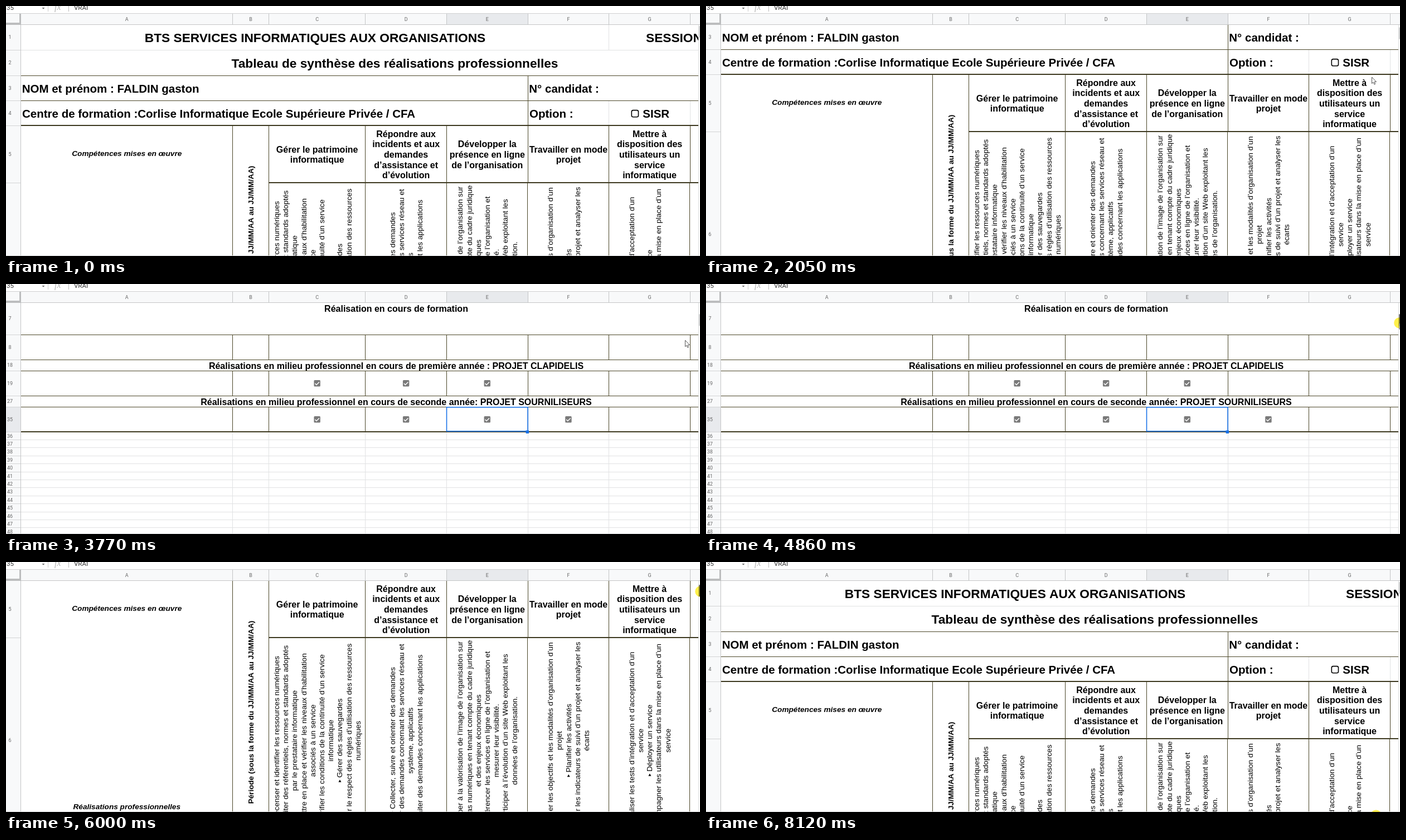
An HTML page with a canvas that plays this animation: 1245 by 450 pixels, repeating every 8250 ms.

```html
<!DOCTYPE html>
<html lang="fr">
<head>
<meta charset="utf-8">
<title>Tableau de synthèse</title>
<style>
html, body { margin: 0; width: 100%; height: 100%; overflow: hidden; background: #fff; }
canvas { display: block; }
</style>
</head>
<body>
<canvas id="stage" width="1245" height="450"></canvas>
<script>
const ctx = document.getElementById('stage').getContext('2d');
const LOOP = 8250, HEAD = 34, RIGHT = 1243;
const ARIAL = '"Liberation Sans", Arial, sans-serif';
const ROBOTO = 'Roboto, Arial, sans-serif';
const DARK = '#4b4628', THICK = '#3d3920', PALE = '#e1e2e3';

const cols = [27, 406.5, 471.5, 644.8, 790.45, 936.1, 1081.75, 1227.4];
const tops = [34, 80, 126, 171, 216, 319, 689, 747, 792, 812, 857, 877, 922];
const labels = [1, 2, 3, 4, 5, 6, 7, 8, 18, 19, 27, 35];
for (let n = 36; n < 56; n++) {
  labels.push(n);
  tops.push(922 + (n - 35) * 14.4);
}
const rowMid = i => (tops[i] + tops[i + 1]) / 2;
const colMid = i => (cols[i] + cols[i + 1]) / 2;

// [time, index of the first visible row]
const scrolls = [[0, 0], [1980, 1], [2050, 2], [2510, 4], [3100, 5], [3640, 6],
  [4980, 5], [5930, 4], [6060, 3], [6130, 1], [6200, 0]];

// [time, x, y] of the pointer tip
const path = [[0, 1172, 456], [110, 1173, 445], [500, 1166, 340], [920, 1146, 233], [1060, 1146, 233],
  [1330, 1223, 152], [1590, 1194.5, 128], [3640, 1194.5, 128], [3900, 1242, 75], [4170, 1242, 75],
  [4390, 1244, 70], [4860, 1244, 70], [5050, 1244, 62], [5390, 1245, 61], [6000, 1246, 53],
  [6200, 1246, 48], [6530, 1246, 44], [7260, 1246, 44], [7440, 1205, 180], [7620, 1168, 330],
  [7790, 1190, 456], [8120, 1202, 456], [8250, 1202, 456]];

const headings = [
  [2, ['Gérer le patrimoine', 'informatique']],
  [3, ['Répondre aux', 'incidents et aux', 'demandes', 'd’assistance et', 'd’évolution']],
  [4, ['Développer la', 'présence en ligne', 'de l’organisation']],
  [5, ['Travailler en mode', 'projet']],
  [6, ['Mettre à', 'disposition des', 'utilisateurs un', 'service', 'informatique']]
];

// A leading * marks a bulleted line
const skills = [
  [2, ['*Recenser et identifier les ressources numériques',
    '*Exploiter des référentiels, normes et standards adoptés',
    'par le prestataire informatique',
    '*Mettre en place et vérifier les niveaux d’habilitation',
    'associés à un service',
    '*Vérifier les conditions de la continuité d’un service',
    'informatique',
    '*Gérer des sauvegardes',
    '*Vérifier le respect des règles d’utilisation des ressources',
    'numériques']],
  [3, ['*Collecter, suivre et orienter des demandes',
    '*Traiter des demandes concernant les services réseau et',
    'système, applicatifs',
    '*Traiter des demandes concernant les applications']],
  [4, ['*Participer à la valorisation de l’image de l’organisation sur',
    'les médias numériques en tenant compte du cadre juridique',
    'et des enjeux économiques',
    '*Référencer les services en ligne de l’organisation et',
    'mesurer leur visibilité.',
    '*Participer à l’évolution d’un site Web exploitant les',
    'données de l’organisation.']],
  [5, ['*Analyser les objectifs et les modalités d’organisation d’un',
    'projet',
    '*Planifier les activités',
    '*Évaluer les indicateurs de suivi d’un projet et analyser les',
    'écarts']],
  [6, ['*Réaliser les tests d’intégration et d’acceptation d’un',
    'service',
    '*Déployer un service',
    '*Accompagner les utilisateurs dans la mise en place d’un',
    'service']]
];

function rect(x, y, w, h, color) {
  ctx.fillStyle = color;
  ctx.fillRect(x, y, w, h);
}

function text(str, x, y, size, style = 'bold', align = 'center', color = '#000', family = ARIAL) {
  ctx.font = `${style} ${size}px ${family}`;
  ctx.textAlign = align;
  ctx.fillStyle = color;
  ctx.fillText(str, x, y + size * 0.346);
}

function poly(points, fill) {
  ctx.beginPath();
  points.forEach(([x, y]) => ctx.lineTo(x, y));
  ctx.closePath();
  ctx.fillStyle = fill;
  ctx.fill();
}

function upright(str, x, y, style) {
  const bullet = str[0] === '*';
  ctx.save();
  ctx.translate(x, y);
  ctx.rotate(-Math.PI / 2);
  text(bullet ? str.slice(1) : str, bullet ? 4.5 : 0, 0, 13.65, style);
  if (bullet) {
    const left = 4.5 - ctx.measureText(str.slice(1)).width / 2 - 8;
    poly([[left, -2.2], [left + 4.5, 0.3], [left, 2.8]], '#000');
  }
  ctx.restore();
}

function clip(x, y, w, h, draw) {
  ctx.save();
  ctx.beginPath();
  ctx.rect(x, y, w, h);
  ctx.clip();
  draw();
  ctx.restore();
}

function checkbox(x, y) {
  ctx.fillStyle = '#7a7a7a';
  ctx.beginPath();
  ctx.roundRect(x - 5.7, y - 5.7, 11.4, 11.4, 1.5);
  ctx.fill();
  ctx.strokeStyle = '#fff';
  ctx.lineWidth = 1.4;
  ctx.beginPath();
  ctx.moveTo(x - 3.8, y + 0.2);
  ctx.lineTo(x - 1.2, y + 2.8);
  ctx.lineTo(x + 3.8, y - 2.4);
  ctx.stroke();
}

function drawCells(scroll) {
  const Y = y => y - scroll;
  // Each line closes the row above it
  const hline = (i, color, h = 1, x = 27) => rect(x, Math.floor(Y(tops[i])) - h, RIGHT - x, h, color);
  const vline = (c, from, to, color, shift = 0) => {
    const top = Math.floor(Y(tops[from]));
    rect(Math.floor(cols[c] - shift), top, 1, Math.floor(Y(tops[to])) - top, color);
  };

  // Pale grid
  hline(1, PALE);
  vline(6, 0, 1, PALE);
  vline(6, 3, 4, PALE);
  vline(7, 3, 4, PALE);
  for (let i = 13; i < tops.length; i++) hline(i, PALE);
  for (let c = 1; c < 8; c++) vline(c, 12, tops.length - 1, PALE);

  // Table borders
  vline(5, 2, 4, DARK);
  for (let c = 1; c < 8; c++) {
    vline(c, 4, 5, DARK);
    vline(c, 5, 6, DARK, 0.45);
    for (const r of [7, 9, 11]) vline(c, r, r + 1, DARK);
  }
  for (const r of [2, 3, 7, 8, 9, 10, 11]) hline(r, DARK);
  hline(4, THICK, 2);
  hline(5, THICK, 2, 471);
  hline(6, THICK, 2);
  hline(12, THICK, 2);

  // Title rows
  text('BTS SERVICES INFORMATIQUES AUX ORGANISATIONS', 554.5, Y(rowMid(0)), 22.7);
  text('SESSION', 1148, Y(rowMid(0)), 22.7, 'bold', 'left');
  text('Tableau de synthèse des réalisations professionnelles', 697.5, Y(rowMid(1)), 22.7);
  text('NOM et prénom : FALDIN gaston', 28.7, Y(rowMid(2)), 20.5, 'bold', 'left');
  text('N° candidat :', 938.3, Y(rowMid(2)), 20.5, 'bold', 'left');
  text('Centre de formation :Corlise Informatique Ecole Supérieure Privée / CFA',
    29, Y(rowMid(3)), 20.5, 'bold', 'left');
  text('Option :', 939, Y(rowMid(3)), 20.5, 'bold', 'left');
  text('SISR', 1142.3, Y(rowMid(3)), 20.5, 'bold', 'left');
  ctx.strokeStyle = '#000';
  ctx.lineWidth = 1.6;
  ctx.beginPath();
  ctx.roundRect(1122.3, Y(187.6), 12.2, 12.2, 2.8);
  ctx.stroke();

  // Skill columns
  for (const [c, lines] of headings)
    lines.forEach((s, i) =>
      text(s, colMid(c), Y(rowMid(4)) + (i - (lines.length - 1) / 2) * 18.7, 16));
  for (const [c, lines] of skills)
    lines.forEach((s, i) =>
      upright(s, colMid(c) + (i - (lines.length - 1) / 2) * 16.2, Y(503.5), 'normal'));
  upright('Période (sous la forme du JJ/MM/AA au JJ/MM/AA)', colMid(1), Y(452.5), 'bold');
  text('Compétences mises en œuvre', colMid(0), Y(265.3), 13.65, 'italic bold');
  text('Réalisations professionnelles', colMid(0), Y(622.3), 13.65, 'italic bold');
  text('(intitulé et liste des documents et productions associés)', colMid(0), Y(638.8), 13.65, 'italic bold');

  // Section rows
  text('Réalisation en cours de formation', 700, Y(699), 16);
  text('Réalisations en milieu professionnel en cours de première année : PROJET CLAPIDELIS',
    700, Y(rowMid(8)), 16);
  text('Réalisations en milieu professionnel en cours de seconde année: PROJET SOURNILISEURS',
    700, Y(rowMid(10)), 16);
  for (const c of [2, 3, 4]) checkbox(colMid(c), Y(rowMid(9)) - 0.7);
  for (const c of [2, 3, 4, 5]) checkbox(colMid(c), Y(rowMid(11)) - 0.7);

  // Selected cell
  ctx.strokeStyle = '#1a73e8';
  ctx.lineWidth = 1.6;
  ctx.strokeRect(790.5, Y(876.8), 145.6, 43.2);
  rect(932.5, Y(918.5), 5.5, 5.5, '#1a73e8');
}

function drawRowLabels(scroll) {
  rect(0, HEAD, 27, 416, '#f8f9fa');
  labels.forEach((n, i) => {
    const y = tops[i] - scroll;
    if (n === 35) rect(0, y, 27, 44, '#e8eaed');
    if (i) rect(0, Math.floor(y) - 1, 27, 1, '#d3d4d5');
    text(n, 7, rowMid(i) - scroll - 0.7, 9, 'normal', 'center', '#666', ROBOTO);
  });
  rect(26, HEAD, 1, 416, '#c4c5c6');
}

function drawHeader() {
  rect(0, 0, 1245, HEAD, '#fff');
  text('35', 1, 2.8, 11.5, 'normal', 'left', '#333', ROBOTO);
  poly([[64.5, 3], [69.5, 3], [67, 5.6]], '#666');
  rect(75, 0, 1, 10, '#d0d0d0');
  text('fx', 87, 1.6, 16, 'italic', 'left', '#b5b5b5', '"Liberation Serif", serif');
  rect(112, 0, 1, 10, '#bbb');
  text('VRAI', 122, 2.8, 11.5, 'normal', 'left', '#333', ROBOTO);

  rect(0, 13, 1245, 21, '#f8f9fa');
  rect(790, 13, 146, 21, '#e8eaed');
  rect(0, 13, 1245, 1, '#cfd0d1');
  rect(0, 33, 1245, 1, '#c4c5c6');
  for (let c = 0; c < 8; c++) {
    if (c) rect(Math.floor(cols[c]), 14, 1, 20, '#c4c5c6');
    if (c < 7) text('ABCDEFG'[c], colMid(c), 23.7, 9, 'normal', 'center', '#666', ROBOTO);
  }
  rect(0, 30, 27, 4, '#bcbdbe');
  rect(24, 14, 3, 20, '#bcbdbe');
}

function drawScrollbar(scroll, active) {
  rect(1242, HEAD, 3, 416, '#fff');
  rect(1242, HEAD, 1, 416, '#dcdddd');
  rect(1243, 36 + scroll * 0.028, 2, 21, active ? '#777' : '#d4d5d6');
}

function pointerAt(t) {
  let i = 1;
  while (i < path.length - 1 && path[i][0] <= t) i++;
  const [t0, x0, y0] = path[i - 1], [t1, x1, y1] = path[i];
  const k = (t - t0) / (t1 - t0);
  return [x0 + (x1 - x0) * k, y0 + (y1 - y0) * k];
}

function drawPointer(t) {
  if (t < 110) return;
  const [x, y] = pointerAt(t);
  if ((t >= 4580 && t < 7260) || t >= 8120) {
    ctx.save();
    ctx.globalCompositeOperation = 'multiply';
    ctx.fillStyle = '#fff04a';
    ctx.beginPath();
    ctx.arc(x, y, 9.8, 0, 7);
    ctx.fill();
    ctx.restore();
  }
  const arrow = [[0, 0], [0, 11.5], [2.6, 9.2], [4.4, 13.2], [6.2, 12.4], [4.5, 8.6], [8, 8.4]];
  poly(arrow.map(([dx, dy]) => [x + dx, y + dy]), '#fff');
  ctx.strokeStyle = '#555';
  ctx.lineWidth = 1;
  ctx.stroke();
}

function render(t) {
  const scroll = tops[scrolls.filter(s => s[0] <= t).pop()[1]] - HEAD;
  rect(0, 0, 1245, 450, '#fff');
  clip(27, HEAD, RIGHT - 27, 416, () => drawCells(scroll));
  clip(0, HEAD, 27, 416, () => drawRowLabels(scroll));
  drawHeader();
  drawScrollbar(scroll, t >= 3900 && t < 7260);
  rect(0, 449, 1245, 1, '#d3d4d5');
  drawPointer(t);
}

const start = performance.now();
function tick() {
  render((performance.now() - start) % LOOP);
  requestAnimationFrame(tick);
}
tick();
</script>
</body>
</html>
```
